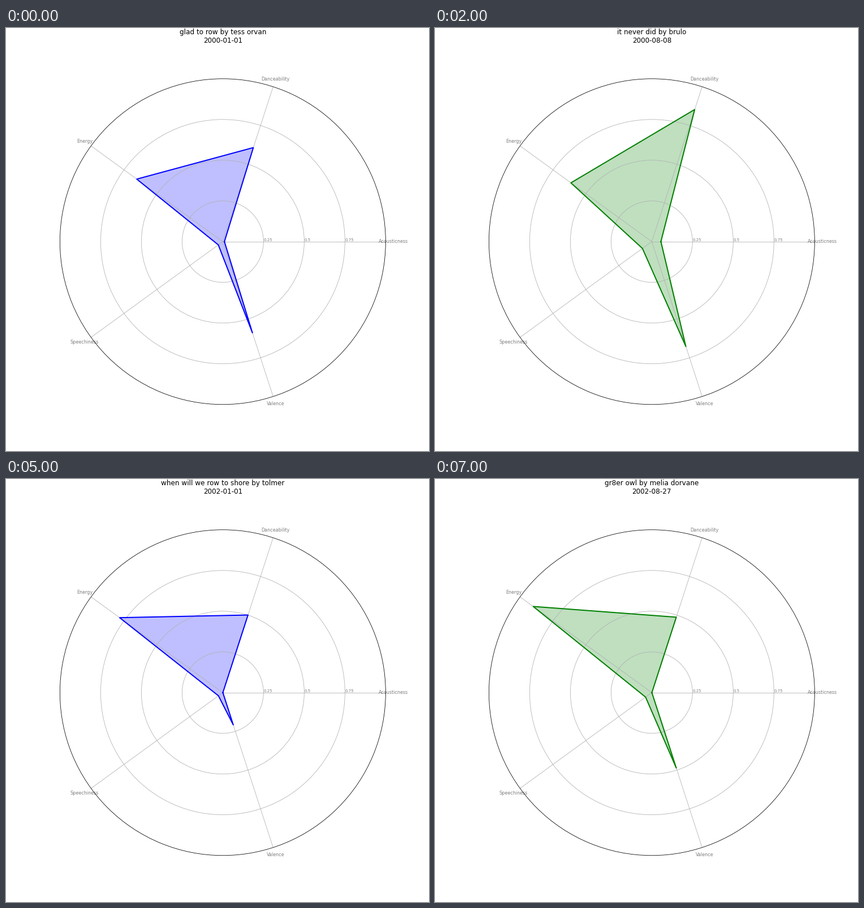
Write a matplotlib script that moves like this. It is 748 px wide and 748 px high and loops after 8000 ms.

```python
import numpy as np
import matplotlib.pyplot as plt
from matplotlib.animation import FuncAnimation

SIZE, DPI = 748, 72
LABELS = ["Acousticness", "Danceability", "Energy", "Speechiness", "Valence"]
COLORS = "brgmy"

# title, date, one value per label
SONGS = [
    ("glad to row by tess orvan", "2000-01-01", [0.010, 0.607, 0.653, 0.034, 0.589]),
    ("wound up by kvz", "2000-06-06", [0.077, 0.499, 0.942, 0.336, 0.561]),
    ("it never did by brulo", "2000-08-08", [0.056, 0.853, 0.614, 0.071, 0.677]),
    ("i nap by jo vust", "2001-04-03", [0.270, 0.639, 0.548, 0.225, 0.315]),
    ("kettle, ladder, button! by mr. plonks", "2001-08-12",
     [0.128, 0.800, 0.929, 0.074, 0.807]),
    ("when will we row to shore by tolmer", "2002-01-01",
     [0.0005, 0.501, 0.783, 0.033, 0.208]),
    ("slow paint by nurvo", "2002-05-21", [0.080, 0.640, 0.690, 0.060, 0.561]),
    ("gr8er owl by melia dorvane", "2002-08-27", [0.0005, 0.487, 0.900, 0.047, 0.487]),
]

angles = np.arange(len(LABELS)) * 2 * np.pi / len(LABELS)
loop = np.append(angles, angles[0])

fig = plt.figure(figsize=(SIZE / DPI, SIZE / DPI), dpi=DPI, facecolor="white")
ax = fig.add_subplot(111, polar=True)
ax.set_xticks(angles, LABELS, color="grey", size=8)
ax.set_rlabel_position(0)
ax.set_yticks([0.25, 0.5, 0.75], ["0.25", "0.5", "0.75"], color="grey", size=7)

line, = ax.plot(loop, np.zeros(len(loop)), linewidth=2)
area, = ax.fill(loop, np.zeros(len(loop)), alpha=0.25)
title = ax.set_title("", size=12, y=1.1)
ax.set_ylim(0, 1)


def show(i):
    name, date, values = SONGS[i]
    color = COLORS[i % len(COLORS)]
    radii = np.append(values, values[0])
    line.set_data(loop, radii)
    line.set_color(color)
    area.set_xy(np.column_stack([loop, radii]))
    area.set_color(color)
    title.set_text(f"{name}\n{date}")
    return line, area, title


anim = FuncAnimation(fig, show, frames=len(SONGS), init_func=lambda: show(0),
                     interval=1000, repeat=True)
plt.show()
```
